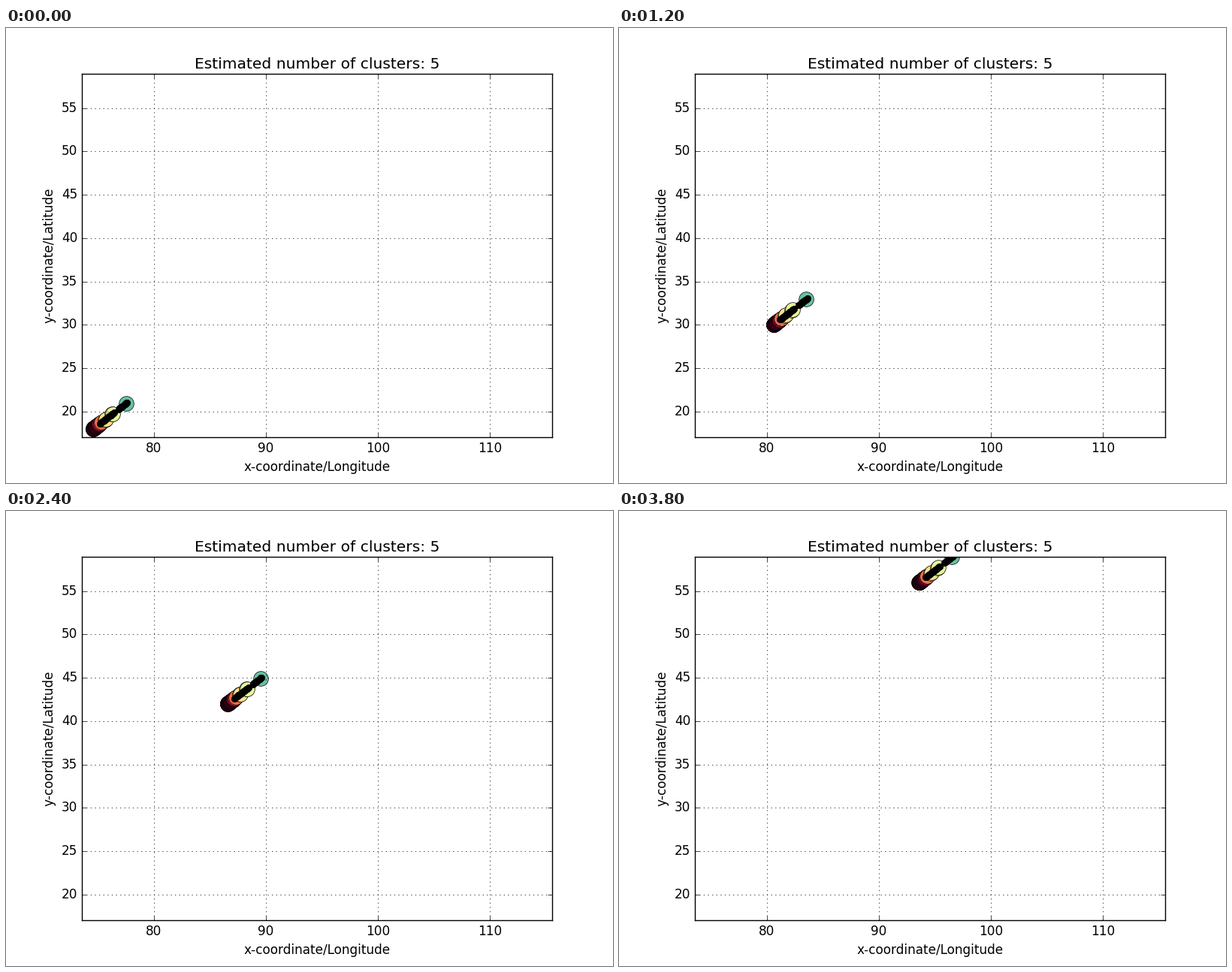
Write a matplotlib script that moves like this. It is 808 px wide and 606 px high and loops after 4000 ms.

```python
import numpy as np
import matplotlib.pyplot as plt
from matplotlib.animation import FuncAnimation

plt.style.use("classic")
plt.rcParams.update({
    "font.family": "DejaVu Sans",
    "figure.dpi": 101,
    "savefig.dpi": 101,
    "figure.facecolor": "white",
    "savefig.facecolor": "white",
})

FRAMES, INTERVAL = 20, 200
X0, Y0 = 74.58, 18.02       # first point at the start
VX, VY = 1.0, 2.0           # drift per frame
CORE, SMALL = 14, 6         # marker sizes

# Distances of the points along the diagonal, one array per cluster
clusters = [
    0.54 * np.linspace(0, 1, 30) ** 2,
    np.array([0.66, 0.72]),
    np.array([1.05, 1.11]),
    np.array([1.66, 1.72]),
    np.array([2.94]),
]
noise = np.concatenate([np.linspace(0.58, 1.84, 24), np.linspace(2.24, 3.03, 14)])

fig, ax = plt.subplots(figsize=(8, 6))
ax.set_xlim(73.56, 115.56)
ax.set_ylim(17, 59)
ax.set_xticks(range(80, 111, 10))
ax.set_yticks(range(20, 56, 5))
ax.grid(True)
ax.set_title(f"Estimated number of clusters: {len(clusters)}")
ax.set_xlabel("x-coordinate/Longitude")
ax.set_ylabel("y-coordinate/Latitude")


def dots(color, size):
    return ax.plot([], [], "o", markerfacecolor=color,
                   markeredgecolor="k", markersize=size)[0]


colors = plt.cm.Spectral(np.linspace(0, 1, len(clusters) + 1))
groups = [(dots(c, CORE), d) for c, d in zip(colors, clusters)]
groups.append((dots("k", SMALL), noise))


def update(i):
    for line, d in groups:
        line.set_data(X0 + VX * i + d, Y0 + VY * i + d)
    return [line for line, _ in groups]


anim = FuncAnimation(fig, update, frames=FRAMES, interval=INTERVAL,
                     repeat=True, repeat_delay=0)
plt.show()
```
